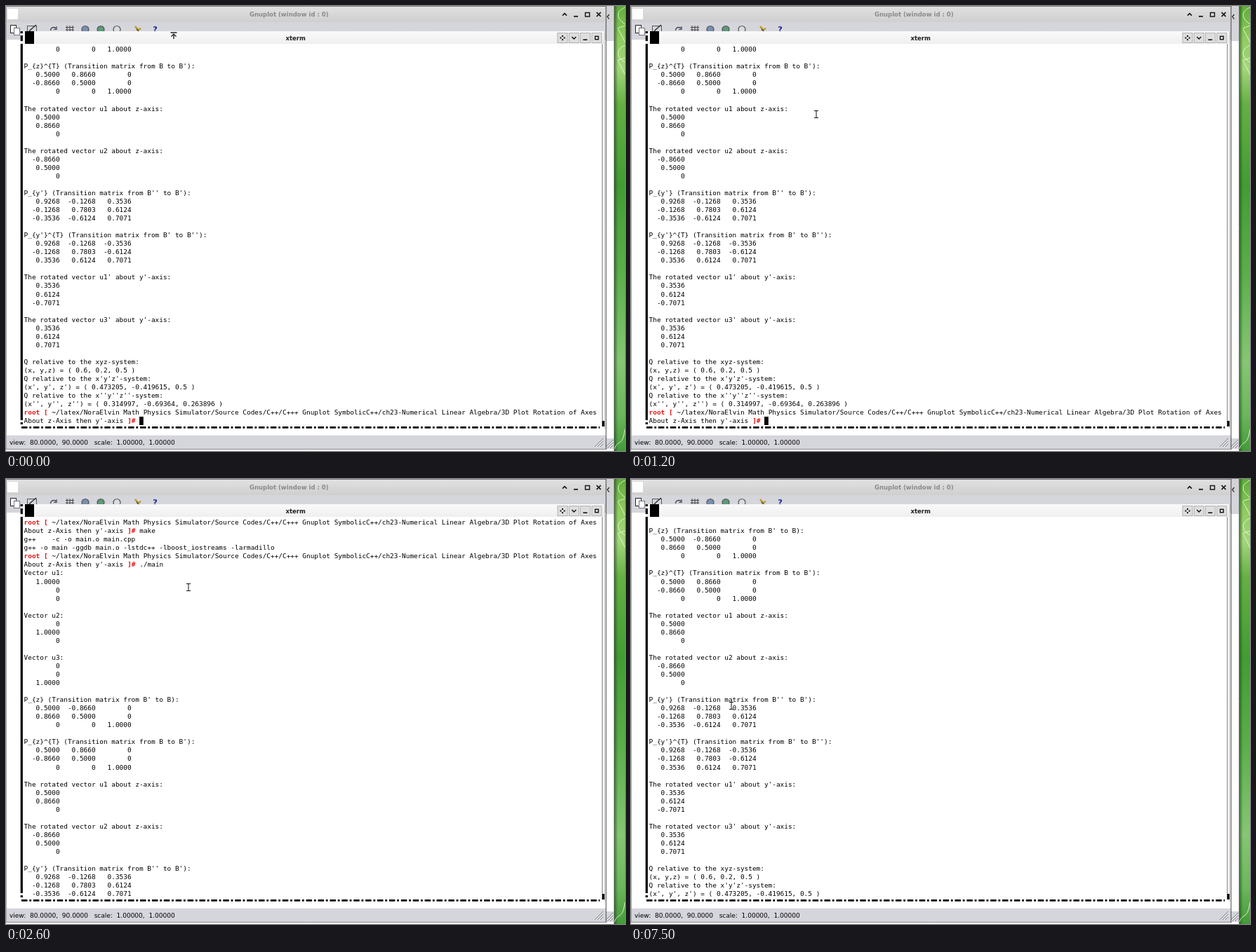
Write an HTML page with a canvas that moves like this. It is 882 px wide and 635 px high and loops after 8000 ms.

```html
<!DOCTYPE html>
<html lang="en">
<head>
<meta charset="utf-8">
<title>Terminal scroll</title>
<style>
html, body { margin: 0; width: 100%; height: 100%; overflow: hidden; background: #fff; }
canvas { display: block; width: 882px; height: 635px; }
</style>
</head>
<body>
<canvas id="stage" width="882" height="635"></canvas>
<script>
const ctx = document.getElementById('stage').getContext('2d');
const LOOP = 8000;
const SCALE = 0.7096;            // desktop pixels to stage pixels
const COL = 8 * SCALE, ROW = 12.045;
const LEFT = 25.6, TOP = 56, ROWS = 45;
const MONO = '"DejaVu Sans Mono", monospace';
const SANS = '"DejaVu Sans", sans-serif';
const RED = '#e81010';

// ---- helpers ----
function rect(x, y, w, h, color) {
  ctx.fillStyle = color;
  ctx.fillRect(x, y, w, h);
}

function stroke(points, color = '#000', width = 1) {
  ctx.strokeStyle = color;
  ctx.lineWidth = width;
  ctx.beginPath();
  points.forEach(([x, y], i) => i ? ctx.lineTo(x, y) : ctx.moveTo(x, y));
  ctx.stroke();
}

function box(x, y, w, h, color = '#000', width = 1) {
  ctx.strokeStyle = color;
  ctx.lineWidth = width;
  ctx.strokeRect(x, y, w, h);
}

function ring(x, y, r, fill, line, width = 1) {
  ctx.beginPath();
  ctx.arc(x, y, r, 0, 7);
  ctx.fillStyle = fill;
  ctx.fill();
  ctx.strokeStyle = line;
  ctx.lineWidth = width;
  ctx.stroke();
}

function fade(x0, y0, x1, y1, stops) {
  const g = ctx.createLinearGradient(x0, y0, x1, y1);
  stops.forEach(([at, color]) => g.addColorStop(at, color));
  return g;
}

function text(str, x, y, font, color = '#000', align = 'left') {
  ctx.save();
  ctx.translate(x, y);
  ctx.scale(SCALE, SCALE);
  ctx.font = font;
  ctx.fillStyle = color;
  ctx.textAlign = align;
  ctx.fillText(str, 0, 0);
  ctx.restore();
}

// ---- terminal transcript ----
const cells = row => row.trim().split(' ').map(v => v.padStart(9)).join('');
const block = (title, rows) => [title, ...rows.split(';').map(cells), ''];
const prompt = cmd => [
  [['root [', RED], [' ~/latex/NoraElvin Math Physics Simulator/Source Codes/C++/C+++ Gnuplot ' +
    'SymbolicC++/ch23-Numerical Linear Algebra/3D Plot Rotation of Axes']],
  [["About z-Axis then y'-axis "], [']#', RED], [' ' + cmd]]
];

const lines = [
  ...prompt('make'),
  'g++    -c -o main.o main.cpp',
  'g++ -o main -ggdb main.o -lstdc++ -lboost_iostreams -larmadillo',
  ...prompt('./main'),
  ...block('Vector u1:', '1.0000;0;0'),
  ...block('Vector u2:', '0;1.0000;0'),
  ...block('Vector u3:', '0;0;1.0000'),
  ...block("P_{z} (Transition matrix from B' to B):", '0.5000 -0.8660 0;0.8660 0.5000 0;0 0 1.0000'),
  ...block("P_{z}^{T} (Transition matrix from B to B'):", '0.5000 0.8660 0;-0.8660 0.5000 0;0 0 1.0000'),
  ...block('The rotated vector u1 about z-axis:', '0.5000;0.8660;0'),
  ...block('The rotated vector u2 about z-axis:', '-0.8660;0.5000;0'),
  ...block("P_{y'} (Transition matrix from B'' to B'):",
    '0.9268 -0.1268 0.3536;-0.1268 0.7803 0.6124;-0.3536 -0.6124 0.7071'),
  ...block("P_{y'}^{T} (Transition matrix from B' to B''):",
    '0.9268 -0.1268 -0.3536;-0.1268 0.7803 -0.6124;0.3536 0.6124 0.7071'),
  ...block("The rotated vector u1' about y'-axis:", '0.3536;0.6124;-0.7071'),
  ...block("The rotated vector u3' about y'-axis:", '0.3536;0.6124;0.7071'),
  'Q relative to the xyz-system:',
  '(x, y,z) = ( 0.6, 0.2, 0.5 )',
  "Q relative to the x'y'z'-system:",
  "(x', y', z') = ( 0.473205, -0.419615, 0.5 )",
  "Q relative to the x''y''z''-system:",
  "(x'', y'', z'') = ( 0.314997, -0.69364, 0.263896 )",
  ...prompt('')
];

function drawLines(scroll, caret) {
  for (let r = 0; r < ROWS; r++) {
    const line = lines[scroll + r];
    const y = TOP + r * ROW + 9.2;
    let col = 0;
    for (const [str, color] of Array.isArray(line) ? line : [[line]]) {
      const font = (color ? 'bold ' : '') + '13.288px ' + MONO;
      text(str, LEFT + col * COL, y, font, color);
      col += str.length;
    }
  }
  if (caret) rect(190, 586, 5.8, 12, '#000');
}

// ---- desktop ----
function drawWallpaper() {
  rect(867, 0, 15, 635, fade(0, 0, 0, 635, [
    [0, '#5fab3a'], [0.07, '#8fcb60'], [0.14, '#a4d67c'], [0.22, '#66b044'],
    [0.4, '#439c33'], [0.6, '#5cae4c'], [0.8, '#86c674'], [0.92, '#6cb65c'], [1, '#449a3a']]));
  rect(867, 0, 5, 635, fade(867, 0, 872, 0, [[0, 'rgba(10,60,10,.55)'], [1, 'rgba(10,60,10,0)']]));
  ctx.strokeStyle = 'rgba(240,255,225,.85)';
  ctx.lineWidth = 1;
  for (const [y, bend] of [[8, 10], [34, -8], [62, 12], [80, -9]]) {
    ctx.beginPath();
    ctx.moveTo(882, y - 6);
    ctx.bezierCurveTo(868, y, 870, y + bend, 882, y + 18);
    ctx.stroke();
  }
  ctx.beginPath();
  ctx.moveTo(867, 632);
  ctx.bezierCurveTo(872, 618, 878, 630, 882, 604);
  ctx.stroke();
}

function grip(x, y) {
  for (let i = 0; i < 3; i++) {
    const d = 4 + i * 4;
    stroke([[x - d, y], [x, y - d]], '#777', 1);
    stroke([[x - d + 1, y], [x, y - d + 1]], '#fff', 0.7);
  }
}

function drawToolbar() {
  rect(6, 27, 9, 12, '#fff');
  box(6.5, 27.5, 8, 11, '#222');
  rect(11, 31, 9, 11, '#fff');
  box(11.5, 31.5, 8, 10, '#555', 0.8);
  box(30.5, 28.5, 13, 12, '#555');
  stroke([[33, 36], [37, 32], [43, 27]], '#333', 1.5);
  ctx.beginPath();
  ctx.arc(68, 35, 4.5, 3.2, 5.6);
  ctx.strokeStyle = '#445';
  ctx.lineWidth = 1.6;
  ctx.stroke();
  stroke([[72, 29], [72, 33.5], [68, 33.5]], '#445', 1.2);
  for (let i = 0; i < 3; i++) stroke([[87 + i * 4, 28], [87 + i * 4, 36]], '#444', 1);
  stroke([[85, 30.5], [97, 30.5]], '#444');
  stroke([[85, 34], [97, 34]], '#444');
  for (const [x, fill] of [[113, '#7890b0'], [135, '#5c9a78'], [158, '#d8dcdc']])
    ring(x, 33.5, 5, fill, '#555', 1.2);
  stroke([[184, 29], [188, 34], [192, 32]], '#b89a18', 2.5);
  stroke([[186, 33], [190, 37]], '#444', 1.5);
  text('?', 212.5, 37, 'bold 16px ' + SANS, '#1c2490', 'center');
}

function drawBackWindows() {
  // the window further back, only its right edge shows
  rect(855, 0, 12, 635, '#fff');
  rect(855, 0, 12, 24, '#d3d3d6');
  rect(855, 24, 12, 26, '#d5d5dc');
  rect(855, 617, 12, 15, '#d5d5dc');
  stroke([[859.5, 12], [856.8, 15.3], [859.5, 18.6]], '#222', 1.2);
  stroke([[866.5, 0], [866.5, 635]], '#777');
  grip(865, 631);

  rect(0, 0, 855, 635, '#fff');
  rect(0, 0, 855, 23, fade(0, 0, 0, 23, [[0, '#e2e2e2'], [0.5, '#d8d8d8'], [1, '#cfcfcf']]));
  rect(0, 23, 855, 25, '#d5d5dc');
  rect(0, 612, 855, 20, '#d5d5dc');
  stroke([[0, 0.5], [855, 0.5]], '#777');
  stroke([[0, 612.5], [855, 612.5]], '#f2f2f4');
  stroke([[0, 632.5], [855, 632.5]], '#888');
  stroke([[0.5, 0], [0.5, 632]], '#aaa');
  stroke([[855, 0], [855, 633]], '#444');
  rect(2, 4, 15, 15, '#fff');
  text('Gnuplot (window id : 0)', 403.3, 15.2, 'bold 12px ' + SANS, '#8a8a8a', 'center');
  stroke([[793, 13.6], [796, 10.6], [799, 13.6]], '#111', 1.5);
  stroke([[809, 14.8], [815, 14.8]], '#111', 1.7);
  box(825.5, 9.5, 6, 5.5, '#111', 1.4);
  stroke([[841.5, 9], [847.5, 15]], '#111', 1.7);
  stroke([[847.5, 9], [841.5, 15]], '#111', 1.7);
  drawToolbar();
  text('view:  80.0000,  90.0000   scale:  1.00000,  1.00000', 5, 626, '12.7px ' + SANS);
  grip(851, 629);
}

function drawTerminal() {
  rect(21, 36, 832, 567, '#fff');
  rect(21, 36, 832, 18, fade(0, 36, 0, 54, [[0, '#fafafa'], [1, '#efefef']]));
  rect(27, 36, 13, 18, '#000');
  text('xterm', 412.7, 48.8, 'bold 12px ' + SANS, '#222', 'center');

  for (const x of [785.5, 801.8, 818, 834.3]) {
    rect(x, 38, 15, 15, '#dedede');
    box(x + 0.5, 38.5, 14, 14, '#aaa', 0.8);
  }
  for (const [dx, dy] of [[0, -2.6], [0, 2.6], [-2.6, 0], [2.6, 0]])
    rect(792 + dx, 44.5 + dy, 2, 2, '#111');
  stroke([[806.3, 44], [809.3, 47], [812.3, 44]], '#111', 1.5);
  stroke([[822.3, 48.2], [828.3, 48.2]], '#111', 1.6);
  box(839.5, 43.3, 4.6, 4.4, '#111', 1.4);

  // dashed outline along the frame
  rect(20.7, 36, 3.2, 3, '#000');
  rect(20.7, 42, 3.2, 8, '#000');
  rect(20.7, 54, 3.2, 537, '#000');
  rect(20.7, 594, 3.2, 3, '#000');
  stroke([[849.7, 54], [849.7, 600]], '#666', 0.9);
  stroke([[853, 36], [853, 603]], '#aaa', 0.8);
  rect(849.5, 592, 3.3, 8, '#000');
  ctx.setLineDash([8.5, 2.8, 2.8, 2.8]);
  stroke([[22, 601.4], [846, 601.4]], '#000', 2.9);
  ctx.setLineDash([]);
}

// ---- pointer ----
function drawBeam(x, y) {
  const path = [[[x - 3, y - 5], [x + 3, y - 5]], [[x, y - 5], [x, y + 5]], [[x - 3, y + 5], [x + 3, y + 5]]];
  path.forEach(p => stroke(p, 'rgba(255,255,255,.7)', 2));
  path.forEach(p => stroke(p, '#111', 1));
}

function drawTopEdge(x, y) {
  stroke([[x - 4.5, y - 4], [x + 4.5, y - 4]], '#111', 1.4);
  stroke([[x, y - 2], [x, y + 5]], '#111', 1.3);
  stroke([[x - 3.5, y + 1.5], [x, y - 2], [x + 3.5, y + 1.5]], '#111', 1.2);
}

// start time, pointer x, pointer y, first visible line
const steps = [
  [0, 239, 42, 24],
  [100, 245, 101, 24],
  [400, 254, 161.5, 24],
  [1100, 259, 158, 24],
  [1200, 264, 154.5, 24],
  [2400, 260, 154.5, 24],
  [2500, 260, 154.5, 14],
  [2600, 260, 154.5, 0],
  [7200, 193, 128.5, 20],
  [7500, 143, 323.5, 20]
];

function draw(step, caret) {
  const [start, x, y, scroll] = step;
  drawWallpaper();
  drawBackWindows();
  drawTerminal();
  drawLines(scroll, caret && scroll === 24);
  (start === 0 ? drawTopEdge : drawBeam)(x, y);
}

let shown = '';
function tick() {
  const t = performance.now() % LOOP;
  const step = steps.findLast(s => s[0] <= t);
  const caret = t < 700 || t >= 800;
  const key = step[0] + '/' + caret;
  if (key !== shown) {
    shown = key;
    draw(step, caret);
  }
  requestAnimationFrame(tick);
}
tick();
</script>
</body>
</html>
```
